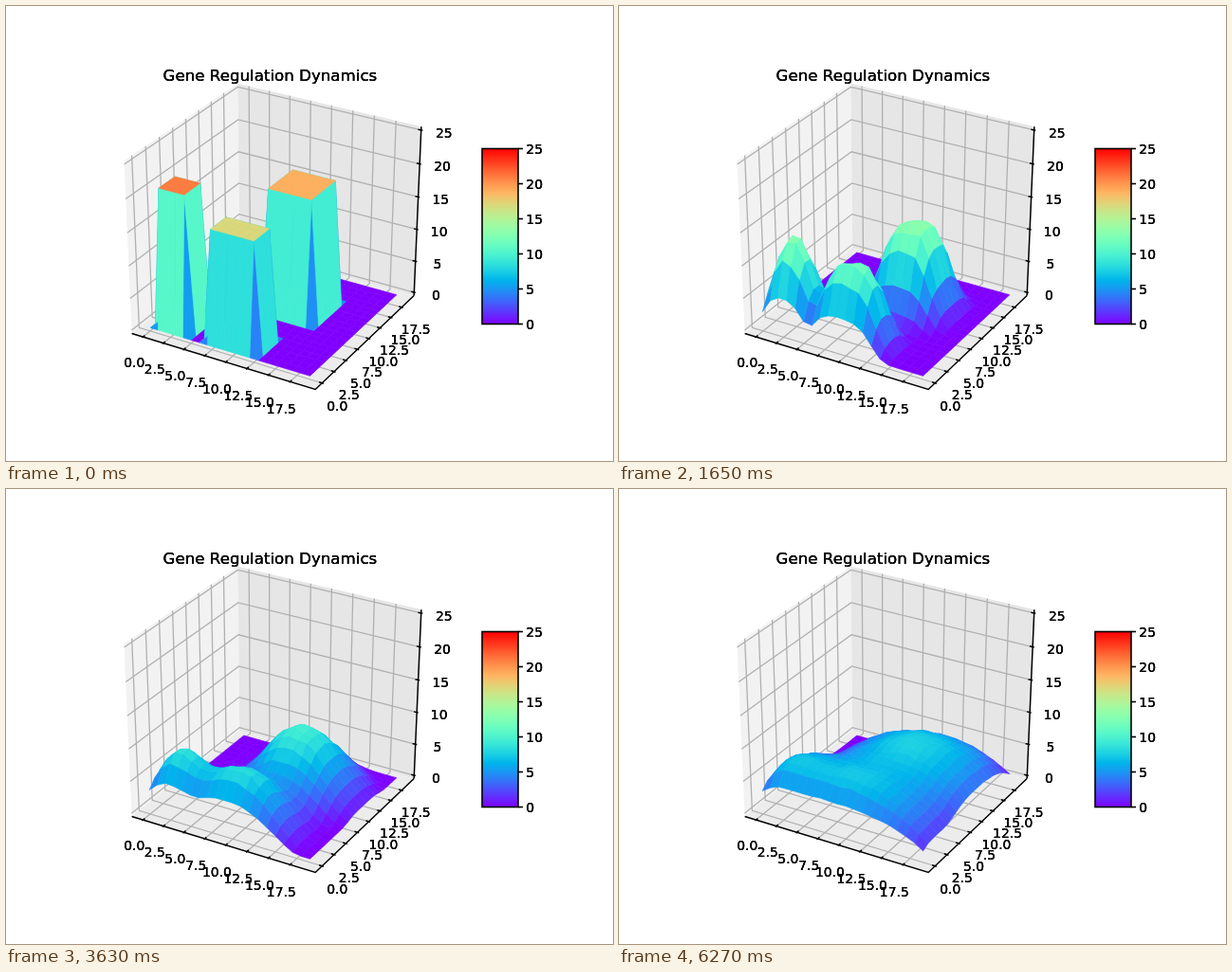
Recreate the animation shown at these times as an HTML page with a canvas. Size 640 px wide and 480 px high, loop 6600 ms.

```html
<!DOCTYPE html>
<html>
<head>
<meta charset="utf-8">
<title>Gene Regulation Dynamics</title>
<style>
html, body { margin: 0; width: 100%; height: 100%; overflow: hidden; background: #fff; }
canvas { display: block; }
</style>
</head>
<body>
<canvas id="stage" width="640" height="480"></canvas>
<script>
const ctx = document.getElementById('stage').getContext('2d');
const N = 20, STEPS = 20, STEP_MS = 330, Z_MAX = 25;
const WALL = 25 / 48;                       // half size of the padded unit cube
const TICKS = [0, 2.5, 5, 7.5, 10, 12.5, 15, 17.5];
const Z_TICKS = [0, 5, 10, 15, 20, 25];

// ---- model: diffusion, saturating production and decay ----
const DIFFUSION = 0.1, PRODUCTION = 0.95, HALF = 0.75, DECAY = 0.12, NOISE = 0.05;
let seed = 7;
const random = () => (seed = seed * 16807 % 2147483647) / 2147483647;

function initialGrid() {
  const grid = Array.from({ length: N }, () => Array(N).fill(0));
  const block = (x0, x1, y0, y1, level) => {
    for (let x = x0; x <= x1; x++) for (let y = y0; y <= y1; y++) grid[x][y] = level;
  };
  block(1, 4, 1, 4, 21);
  block(7, 12, 1, 4, 17);
  block(9, 14, 9, 14, 19);
  return grid;
}

function advance(grid) {
  const at = (x, y) => (grid[x] && grid[x][y]) || 0;
  return grid.map((column, x) => column.map((z, y) => {
    const spread = at(x - 1, y) + at(x + 1, y) + at(x, y - 1) + at(x, y + 1) - 4 * z;
    const growth = PRODUCTION * z / (HALF + z) - DECAY * z;
    return z + DIFFUSION * spread + growth + z * NOISE * (random() - 0.5);
  }));
}

const history = [initialGrid()];
while (history.length < STEPS) history.push(advance(history[history.length - 1]));

// ---- projection: elevation 30 deg, azimuth -60 deg ----
function project([x, y, z]) {
  const depth = 10 - (0.433 * x - 0.75 * y + 0.5 * z);
  return {
    x: 283.8 + 2144.9 * (0.866 * x + 0.5 * y) / depth,
    y: 237.4 - 1997.8 * (-0.25 * x + 0.433 * y + 0.866 * z) / depth,
    depth
  };
}
const unit = v => (v + 0.95) / 20.9 - 0.5;
const unitZ = z => z / Z_MAX - 0.5;

function rainbow(v) {
  const t = Math.min(1, Math.max(0, v));
  const rgb = [Math.abs(2 * t - 0.5), Math.sin(Math.PI * t), Math.cos(Math.PI * t / 2)];
  return `rgb(${rgb.map(c => Math.round(255 * Math.min(1, Math.max(0, c))))})`;
}

function trace(points) {
  ctx.beginPath();
  points.forEach(p => ctx.lineTo(p.x, p.y));
}
function line(color, width, ...points) {
  trace(points.map(project));
  ctx.strokeStyle = color;
  ctx.lineWidth = width;
  ctx.stroke();
}
function pane(color, ...points) {
  trace(points.map(project));
  ctx.fillStyle = color;
  ctx.fill();
}
function label(text, x, y, size = 13.89, align = 'center') {
  ctx.font = `${size}px "DejaVu Sans", sans-serif`;
  ctx.textAlign = align;
  ctx.fillStyle = '#000';
  for (let i = 0; i < 3; i++) ctx.fillText(text, x, y);   // repeated for heavier edges
}

function drawAxes() {
  const w = WALL, grid = '#b0b0b0', out = w + 1 / 120, inner = w - 1 / 60, far = w + 1 / 12;
  pane('#f2f2f2', [-w, -w, -w], [-w, w, -w], [-w, w, w], [-w, -w, w]);
  pane('#e6e6e6', [-w, w, -w], [w, w, -w], [w, w, w], [-w, w, w]);
  pane('#ececec', [-w, -w, -w], [w, -w, -w], [w, w, -w], [-w, w, -w]);
  TICKS.map(unit).forEach(t => {
    line(grid, 1.3, [t, -w, -w], [t, w, -w], [t, w, w]);
    line(grid, 1.3, [w, t, -w], [-w, t, -w], [-w, t, w]);
  });
  Z_TICKS.map(unitZ).forEach(t => line(grid, 1.3, [-w, -w, t], [-w, w, t], [w, w, t]));

  line('#000', 1.5, [-w, -w, -w], [w, -w, -w], [w, w, -w]);
  line('#000', 1.5, [w, w, -w], [w, w, w]);
  const tickLabel = (text, point) => {
    const p = project(point);
    label(text, p.x, p.y + 10.6);
  };
  TICKS.forEach(v => {
    const t = unit(v), text = v.toFixed(1);
    line('#000', 1.5, [t, -out, -w], [t, -inner, -w]);
    line('#000', 1.5, [out, t, -w], [inner, t, -w]);
    tickLabel(text, [t, -far, -far]);
    tickLabel(text, [far, t, -far]);
  });
  Z_TICKS.forEach(v => {
    const t = unitZ(v);
    line('#000', 1.5, [out, w, t], [inner, w, t]);
    tickLabel(v, [far, far, t]);
  });
}

function drawSurface(grid) {
  const vertex = (x, y) => project([unit(x), unit(y), unitZ(grid[x][y])]);
  const faces = [];
  for (let x = 0; x < N - 1; x++) for (let y = 0; y < N - 1; y++) {
    const corners = [[x, y], [x + 1, y], [x + 1, y + 1], [x, y + 1]];
    const points = corners.map(c => vertex(...c));
    const mean = corners.reduce((sum, [i, j]) => sum + grid[i][j], 0) / 4;
    const depth = points.reduce((sum, p) => sum + p.depth, 0);
    faces.push({ points, depth, color: rainbow(mean / Z_MAX) });
  }
  faces.sort((a, b) => b.depth - a.depth);
  ctx.lineWidth = 0.6;
  ctx.lineJoin = 'round';
  faces.forEach(face => {
    trace(face.points);
    ctx.closePath();
    ctx.fillStyle = ctx.strokeStyle = face.color;
    ctx.fill();
    ctx.stroke();
  });
}

function drawColorbar() {
  const x = 502, y = 150.5, width = 38, height = 185;
  const gradient = ctx.createLinearGradient(0, y + height, 0, y);
  for (let i = 0; i <= 32; i++) gradient.addColorStop(i / 32, rainbow(i / 32));
  ctx.fillStyle = gradient;
  ctx.fillRect(x, y, width, height);
  ctx.strokeStyle = '#000';
  ctx.lineWidth = 1.6;
  ctx.lineJoin = 'miter';
  ctx.strokeRect(x, y, width, height);
  Z_TICKS.forEach(v => {
    const ty = y + height * (1 - v / Z_MAX);
    trace([{ x: x + width, y: ty }, { x: x + width + 5, y: ty }]);
    ctx.stroke();
    label(v, 548.3, ty + 5.2, 13.89, 'left');
  });
}

function draw() {
  const step = Math.floor(performance.now() / STEP_MS) % STEPS;
  ctx.fillStyle = '#fff';
  ctx.fillRect(0, 0, 640, 480);
  drawAxes();
  drawSurface(history[step]);
  drawColorbar();
  label('Gene Regulation Dynamics', 278.4, 79, 16.67);
  requestAnimationFrame(draw);
}
draw();
</script>
</body>
</html>
```
